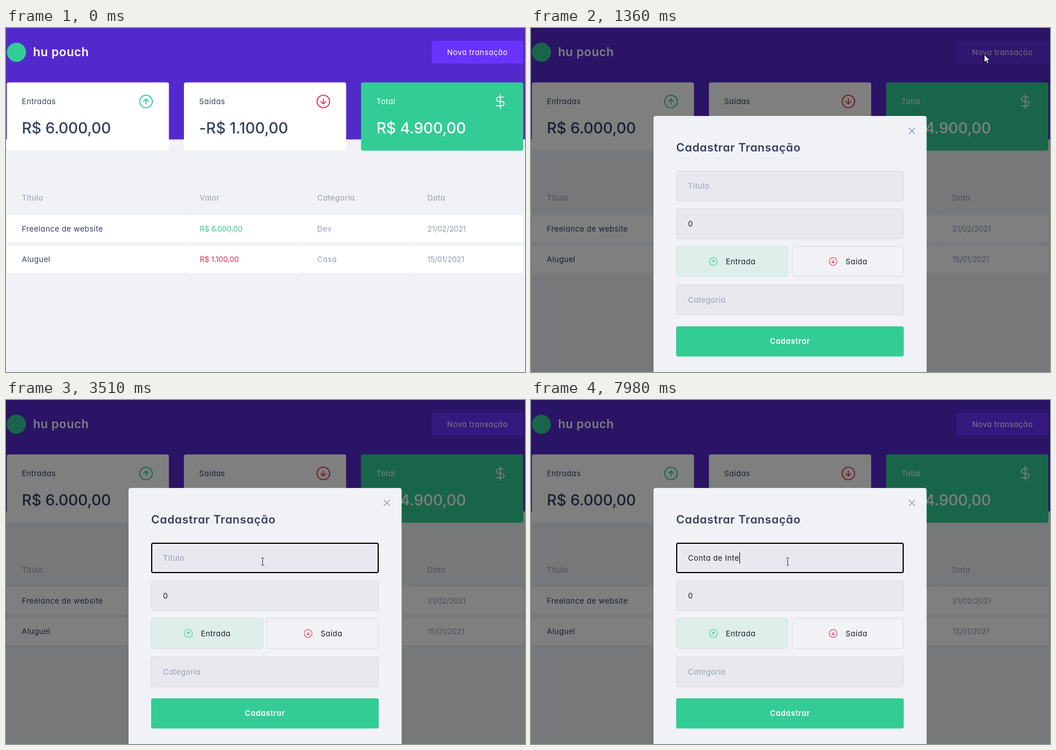
An HTML page for the animation above (8 s loop, 919 by 610 pixels).

```html
<!DOCTYPE html>
<html lang="pt-BR">
<head>
<meta charset="utf-8">
<title>Finanças</title>
<style>
  html, body { margin: 0; width: 100%; height: 100%; overflow: hidden; background: #f0f2f5; }
  svg { display: block; }
  text { font: 400 13.4px Inter, "Open Sans", sans-serif; font-feature-settings: "cv11"; letter-spacing: .42px; white-space: pre; fill: #363f5f; }
  .num { letter-spacing: -.2px; }
  .big { font-size: 26.8px; font-weight: 500; letter-spacing: -.05px; }
  .brand { font-size: 21px; font-weight: 600; letter-spacing: .5px; }
  .heading { font-size: 20.1px; font-weight: 600; letter-spacing: .65px; }
  .strong { font-weight: 600; letter-spacing: .6px; }
  .muted { fill: #969cb3; }
  .dark { fill: #1d1e26; }
  .white { fill: #fff; }
  .green { fill: #33cc95; }
  .red { fill: #e52e4d; }
  .icon { fill: none; stroke-width: 1.5; stroke-linecap: round; stroke-linejoin: round; }
  .up { stroke: #33cc95; }
  .down { stroke: #e52e4d; }
  .field { fill: #e7e9ee; stroke: #d7d9dd; }
  .pointer { fill: #fff; stroke: #000; stroke-linejoin: round; }
</style>
</head>
<body>
<svg width="919" height="610" viewBox="0 0 919 610">
  <defs>
    <g id="arrow-circle"><circle r="10"/><path d="M4 0L0-4-4 0M0 4V-4"/></g>
    <path id="dollar" d="M0-11V11M5-7H-2.5a3.5 3.5 0 0 0 0 7h5a3.5 3.5 0 0 1 0 7H-6"/>
  </defs>

  <rect width="919" height="610" fill="#f0f2f5"/>
  <rect width="919" height="197.6" fill="#5429cc"/>
  <circle cx="18.5" cy="43" r="17" class="green"/>
  <text x="48" y="50" class="brand white">hu pouch</text>
  <rect x="754" y="22.8" width="162" height="40.2" rx="3.4" fill="#6933ff"/>
  <text x="781" y="48" class="white">Nova transação</text>
  <rect id="shade" x="754" y="22.8" width="162" height="40.2" rx="3.4" opacity="0"/>

  <g fill="#fff">
    <rect x="1.5" y="96.5" width="287" height="121" rx="3.4"/>
    <rect x="315" y="96.5" width="287.3" height="121" rx="3.4"/>
    <rect x="628.7" y="96.5" width="287.3" height="121" rx="3.4" class="green"/>
  </g>
  <text x="28" y="135">Entradas</text>
  <text x="342" y="135">Saídas</text>
  <text x="656" y="135" class="white">Total</text>
  <text x="28" y="186.5" class="big">R$ 6.000,00</text>
  <text x="342" y="186.5" class="big">-R$ 1.100,00</text>
  <text x="656" y="186.5" class="big white">R$ 4.900,00</text>
  <use href="#arrow-circle" class="icon up" transform="translate(248 130.3) scale(1.117)"/>
  <use href="#arrow-circle" class="icon down" transform="translate(562 130.3) scale(1.117 -1.117)"/>
  <use href="#dollar" class="icon" stroke="#fff" transform="translate(875.3 130.3) scale(1.117)"/>

  <g id="table"></g>

  <g id="modal" visibility="hidden">
    <rect width="919" height="610" fill="#000" opacity=".5"/>
    <rect x="217" y="156" width="483.5" height="470" rx="4" fill="#f0f2f5"/>
    <path d="M669.5 177.5l10 10m0-10l-10 10" class="icon" stroke="#969cb3"/>
    <text x="257" y="218.5" class="heading">Cadastrar Transação</text>
    <rect x="257.5" y="253.5" width="402" height="53" rx="3" class="field"/>
    <rect x="257.5" y="320.5" width="402" height="53" rx="3" class="field"/>
    <rect x="257.5" y="387.5" width="197" height="53" rx="3" class="field" style="fill:#ddeeeb"/>
    <rect x="462.5" y="387.5" width="197" height="53" rx="3" class="field" style="fill:none"/>
    <rect x="257.5" y="455.5" width="402" height="53" rx="3" class="field"/>
    <rect x="257" y="529" width="403" height="53.5" rx="3.4" class="green"/>
    <text id="title" x="278" y="285">Título</text>
    <text x="278" y="352" class="dark num">0</text>
    <text x="345" y="419" class="dark">Entrada</text>
    <text x="557" y="419" class="dark">Saída</text>
    <text x="278" y="487" class="muted">Categoria</text>
    <text x="458.5" y="560" class="strong white" text-anchor="middle">Cadastrar</text>
    <use href="#arrow-circle" class="icon up" transform="translate(323 414) scale(.7)"/>
    <use href="#arrow-circle" class="icon down" transform="translate(535 414) scale(.7 -.7)"/>
  </g>
  <rect id="focus" x="258" y="254" width="401" height="52" rx="2.5" fill="none" stroke="#000" stroke-width="2" visibility="hidden"/>
  <rect id="caret" y="270" width="1" height="20" visibility="hidden"/>

  <g id="cursor" visibility="hidden">
    <circle id="halo" r="10" fill="#e1c800" opacity=".6"/>
    <path id="arrow" class="pointer" d="M.5 0V14L3.8 11 6 16.2 8.4 15.2 6.2 10.2H10.5Z"/>
    <path id="hand" class="pointer" d="M1 1.5a1.5 1.5 0 0 1 3 0V7l5 1.2q1.6.5 1.4 2.8l-.8 5-1 2.8H3L-2.3 11.8q-.6-2 1.3-1.6L1 11.5zM4 7v3M6.3 7.6v2.6M8.5 8.1v2.4"/>
    <path id="beam" d="M-2.5-6.5h2l.5.5.5-.5h2M0-6V6M-2.5 6.5h2l.5-.5.5.5h2" fill="none" stroke="#333"/>
  </g>
</svg>
<script>
const LOOP = 8000, CLICK = 1230, OPEN = 1360, FOCUS = 2980, BLINK = 530;
const TYPED = 'Conta de Inte';
const KEYS = [3970, 4170, 4450, 4580, 4780, 5040, 5310, 5450, 5650, 7180, 7380, 7710, 7980];
const el = id => document.getElementById(id);
const show = (id, on) => el(id).setAttribute('visibility', on ? 'visible' : 'hidden');
const clamp = v => Math.min(1, Math.max(0, v));
const easeOut = (u, power) => 1 - (1 - u) ** power;
const mix = (a, b, u) => a + (b - a) * u;

function buildTable() {
  const edges = [1.5, 316, 524, 719, 916], textX = [28, 343, 551, 746];
  const label = (s, i, y, cls) => `<text x="${textX[i]}" y="${y}" class="${cls}">${s}</text>`;
  const row = (cells, y, valueClass) => cells.map((s, i) =>
    `<rect x="${edges[i]}" y="${y}" width="${edges[i + 1] - edges[i]}" height="47.7" rx="3.4" fill="#fff"/>` +
    label(s, i, y + 28.5, ['', 'num ' + valueClass, 'muted', 'num muted'][i])).join('');
  el('table').innerHTML =
    ['Título', 'Valor', 'Categoria', 'Data'].map((s, i) => label(s, i, 306, 'muted')).join('') +
    row(['Freelance de website', 'R$ 6.000,00', 'Dev', '21/02/2021'], 332, 'green') +
    row(['Aluguel', 'R$ 1.100,00', 'Casa', '15/01/2021'], 386.5, 'red');
}

// The pointer is sampled at a coarse rate, so it moves in steps.
function pointerAt(t) {
  if (t < 2300) {
    const u = easeOut(clamp(Math.floor((t - 190) / 70) / 10), 2);
    return [mix(778, 802, u), mix(585, 47, u)];
  }
  const u = clamp((Math.floor((t - 2300) / 75.5) + 1) / 8);
  return [mix(802, 454.5, easeOut(u, 1.87)), mix(47, 286.5, easeOut(u, 2.25))];
}

function drawPointer(t) {
  const [x, y] = pointerAt(t);
  const visible = t >= 190;
  const hand = t < OPEN && y < 63;
  const beam = t >= OPEN && x > 257 && x < 660 && y > 253 && y < 307;
  const clicking = (t >= CLICK && t < OPEN) || (t >= FOCUS && t < 3110);
  el('cursor').setAttribute('transform', `translate(${x} ${y})`);
  show('hand', visible && hand);
  show('beam', visible && beam);
  show('arrow', visible && !hand && !beam);
  show('halo', clicking);
}

function drawField(t) {
  const count = KEYS.filter(k => t >= k).length;
  const since = t - (count ? KEYS[count - 1] : FOCUS);
  const title = el('title');
  title.textContent = count ? TYPED.slice(0, count) : 'Título';
  title.setAttribute('class', count ? 'dark' : 'muted');
  title.setAttribute('visibility', t >= OPEN ? 'visible' : 'hidden');
  el('caret').setAttribute('x', Math.round(278 + (count ? title.getComputedTextLength() : 0)));
  show('focus', t >= FOCUS);
  show('caret', t >= FOCUS && Math.floor(since / BLINK) % 2 === 0);
}

function render(t) {
  const hover = t < OPEN ? clamp((t - 750) / 140) : 1 - clamp((t - OPEN) / 200);
  el('shade').setAttribute('opacity', hover * .1);
  show('modal', t >= OPEN);
  drawField(t);
  drawPointer(t);
}

buildTable();
const start = performance.now();
function tick() {
  render((performance.now() - start) % LOOP);
  requestAnimationFrame(tick);
}
tick();
</script>
</body>
</html>
```
